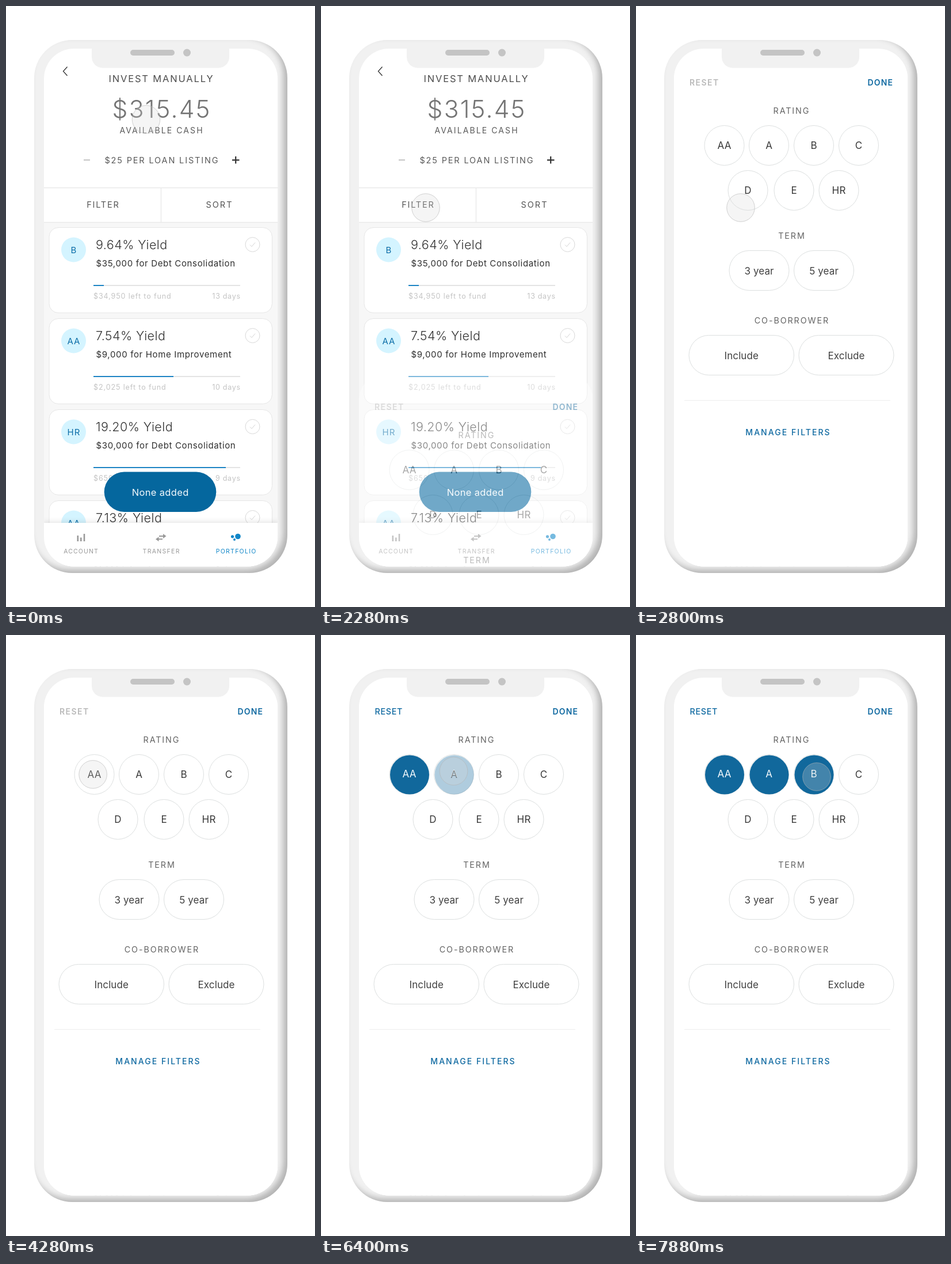
An HTML page for the animation above (9440 ms loop, 537 by 1043 pixels).

```html
<!DOCTYPE html>
<html lang="en">
<head>
<meta charset="utf-8">
<title>Loan filter</title>
<style>
  html, body { margin: 0; width: 100%; height: 100%; overflow: hidden; background: #fff; }
  .phone {
    position: absolute; left: 49px; top: 59px; width: 440px; height: 925px;
    border-radius: 66px; background: #f1f1f1;
    box-shadow: inset -7px -6px 11px rgba(0, 0, 0, .26);
  }
  svg { position: absolute; left: 0; top: 0; font-family: Inter, "Open Sans", sans-serif; }
</style>
</head>
<body>
<div class="phone"></div>
<svg id="stage" width="537" height="1043" viewBox="0 0 537 1043"></svg>
<script>
const LOOP = 9440, STEP = 40, BLUE = '#0d68a0', LINE = '#e6e6e6';

// Text; centred text is shifted to ignore the spacing after its last letter.
function text(str, x, y, size, fill, spacing = 0, anchor = 'middle', weight = 400) {
  const shift = { start: 0, middle: spacing / 2, end: spacing }[anchor];
  return `<text x="${x + shift}" y="${y}" font-size="${size}" fill="${fill}" letter-spacing="${spacing}"
    text-anchor="${anchor}" font-weight="${weight}">${str}</text>`;
}
const rect = (x, y, w, h, r, fill, extra = '') =>
  `<rect x="${x}" y="${y}" width="${w}" height="${h}" rx="${r}" fill="${fill}" ${extra}/>`;
const circle = (x, y, r, fill, extra = '') =>
  `<circle cx="${x}" cy="${y}" r="${r}" fill="${fill}" ${extra}/>`;
const path = (d, stroke, width = 1) =>
  `<path d="${d}" fill="none" stroke="${stroke}" stroke-width="${width}"/>`;

function card([grade, yieldRate, purpose, left, days, progress], i) {
  return `<g transform="translate(0 ${i * 158})">
    ${rect(75, 384.5, 387.5, 148, 16, '#fff', `stroke="${LINE}"`)}
    ${circle(117.5, 423, 21.5, '#d4f4ff')}
    ${text(grade, 117.5, 428.5, 15, '#0d6ea8', 1)}
    ${text(yieldRate + '% Yield', 156, 421.5, 21.5, '#333', .45, 'start', 300)}
    ${text(purpose, 156.5, 452, 15, '#2e2e2e', .65, 'start')}
    ${path('M152 485H407', '#e4e4e4', 2)}
    ${path(`M152 485H${progress}`, '#1d84c4', 2)}
    ${text(`$${left} left to fund`, 152, 507.5, 12.5, '#c4c4c4', .9, 'start')}
    ${text(`${days} days`, 407, 507.5, 12.5, '#c4c4c4', .7, 'end')}
    ${circle(428.5, 414, 12.5, 'none', 'stroke="#d8d8d8"')}
    ${path('M424 414.5l3 3 6-7', '#d4d4d4')}
  </g>`;
}

const loans = [
  ['B', '9.64', '$35,000 for Debt Consolidation', '34,950', 13, 170],
  ['AA', '7.54', '$9,000 for Home Improvement', '2,025', 10, 291],
  ['HR', '19.20', '$30,000 for Debt Consolidation', '650', 9, 382],
  ['AA', '7.13', '$10,000 for Home Improvement', '1,200', 8, 300]
];

const listing = `
  ${path('M106.5 105.5L99.5 113.2l7 7.8', '#333', 1.3)}
  ${text('INVEST MANUALLY', 269, 131.5, 16.5, '#4c4c4c', 1.85)}
  ${text('$315.45', 269.5, 194, 42.5, '#747474', 2.3, 'middle', 300)}
  ${text('AVAILABLE CASH', 269.5, 221, 14, '#5a5a5a', 2.1)}
  ${path('M135 267.3h11', '#b5b5b5', 1.6)}
  ${text('$25 PER LOAN LISTING', 270, 272.5, 14.5, '#5a5a5a', 1.85)}
  ${path('M393 267.3h12.5M399.2 261v12.5', '#333', 2.2)}
  ${rect(66, 375, 407, 600, 0, '#f7f7f7')}
  ${path('M66 315.5H473M269.5 316V375M66 375.5H473', '#e9e9e9', 1.4)}
  ${text('FILTER', 168, 350, 14.5, '#555', 1.8)}
  ${text('SORT', 370, 350, 14.5, '#555', 2)}
  ${loans.map(card).join('')}
  ${rect(66, 897, 407, 80, 0, '#fff', 'filter="url(#soft)"')}
  ${path('M124.8 929v-10M130.3 929v-6.5M136 929v-13', '#999', 2.6)}
  ${path('M266 920h9M264 925.3h8', '#999', 2)}
  <path d="M273 916l5.5 4-5.5 4zM265.5 921.3l-5.5 4 5.5 4z" fill="#999"/>
  ${circle(403, 920.5, 4.8, '#0f86c8')}${circle(393.5, 920.8, 2.6, '#0f86c8')}${circle(397, 926, 2, '#0f86c8')}
  ${text('ACCOUNT', 130, 949.7, 10.5, '#999', 1.1)}
  ${text('TRANSFER', 269.5, 949.7, 10.5, '#999', 1.3)}
  ${text('PORTFOLIO', 399.5, 949.7, 10.5, '#0f86c8', 1.3)}
  ${rect(170.7, 808.5, 194.6, 69.5, 34.7, '#05679e')}
  ${text('None added', 268, 849.7, 16.5, '#f4fafd', .35)}`;

const ratings = [
  ['AA', 153.5, 242], ['A', 231, 242], ['B', 309, 242], ['C', 387, 242],
  ['D', 194.5, 320], ['E', 274.5, 320], ['HR', 352.5, 320]
];
const pills = [
  ['3 year', 162, 424.5, 104], ['5 year', 274.5, 424.5, 104],
  ['Include', 92, 571.5, 182.5], ['Exclude', 283, 571.5, 165]
];
const heading = (str, x, y) => text(str, x, y, 14.3, '#636363', 1.9);
const outline = 'stroke="#dcdfdf"';

const panel = `
  ${rect(66, 75, 407, 960, 46, '#fff')}
  <g id="resetOff">${text('RESET', 93, 137.5, 14, '#b9b9b9', 1.45, 'start', 600)}</g>
  <g id="resetOn">${text('RESET', 93.5, 138, 14.3, BLUE, .7, 'start', 500)}</g>
  ${text('DONE', 446, 137.5, 14, BLUE, 1.2, 'end', 600)}
  ${heading('RATING', 269.5, 186.5)}
  ${heading('TERM', 270, 403.5)}
  ${heading('CO-BORROWER', 270, 550.5)}
  ${ratings.map(([s, x, y]) => circle(x, y, 34.5, '#fff', outline) + text(s, x, y + 6.3, 17, '#383838', .3)).join('')}
  ${ratings.slice(0, 3).map(([s, x, y], i) =>
    `<g id="pick${i}">${circle(x + .5, y + .5, 34, '#11689c')}${text(s, x, y + 5.3, 17, '#f4fafd', .3)}</g>`).join('')}
  ${pills.map(([s, x, y, w]) =>
    rect(x, y, w, 69, 34.5, '#fff', outline) + text(s, x + w / 2, y + 41, 17, '#404040', .1)).join('')}
  ${path('M84 684.5H442', '#eee')}
  ${text('MANAGE FILTERS', 263.5, 745, 14, BLUE, 2.05, 'middle', 500)}`;

const $ = id => document.getElementById(id);
$('stage').innerHTML = `
  <defs>
    <clipPath id="screen">${rect(66, 74, 406, 898.5, 52, '#fff')}</clipPath>
    <filter id="soft" x="-10%" y="-50%" width="120%" height="200%">
      <feDropShadow dx="0" dy="-1" stdDeviation="5" flood-opacity=".13"/>
    </filter>
  </defs>
  <g clip-path="url(#screen)">
    ${rect(66, 74, 407, 900, 0, '#fff')}
    ${listing}
    <g id="panel">${panel}</g>
  </g>
  <path d="M149 72H388V88a19 19 0 0 1-19 19.5H168a19 19 0 0 1-19-19z" fill="#f1f1f1"/>
  ${rect(216, 76, 77, 10, 5, '#c4c4c4')}
  ${circle(314.5, 81, 6.5, '#c4c4c4')}
  ${circle(0, 0, 24.3, 'rgba(215,215,215,.25)', 'id="touch" stroke="rgba(180,180,180,.6)"')}`;

const span = (t, from, to) => Math.min(1, Math.max(0, (t - from) / (to - from)));
const easeOut = (u, power = 2) => 1 - (1 - u) ** power;

// Each touch move: start, end, target x, target y.
const moves = [
  [720, 1280, 182, 342.5], [1580, 1720, 182, 350], [3680, 4320, 151, 241.5],
  [5400, 6160, 230.5, 233.5], [6360, 6480, 230.5, 238.5],
  [6840, 7280, 314, 241.5], [7200, 7280, 314, 246]
];
const picks = [[4920, 5240], [6360, 6480], [7600, 7880]];

function draw(t) {
  let x = 243.5, y = 196.8;
  for (const [from, to, toX, toY] of moves) {
    const p = easeOut(span(t, from, to));
    x += (toX - x) * p;
    y += (toY - y) * p;
  }
  $('touch').setAttribute('transform', `translate(${x} ${y})`);

  const slide = easeOut(span(t, 2120, 2800), 1.74);
  $('panel').setAttribute('transform', `translate(0 ${898 * (1 - slide)})`);
  $('panel').setAttribute('opacity', Math.min(1, slide * 1.16));

  picks.forEach(([from, to], i) => $('pick' + i).setAttribute('opacity', span(t, from, to)));
  const reset = span(t, ...picks[0]);
  $('resetOn').setAttribute('opacity', reset);
  $('resetOff').setAttribute('opacity', 1 - reset);
}

// Runs at 25 pictures a second.
const start = performance.now();
function tick() {
  const t = (performance.now() - start) % LOOP;
  draw(Math.floor(t / STEP) * STEP);
  requestAnimationFrame(tick);
}
tick();
</script>
</body>
</html>
```
